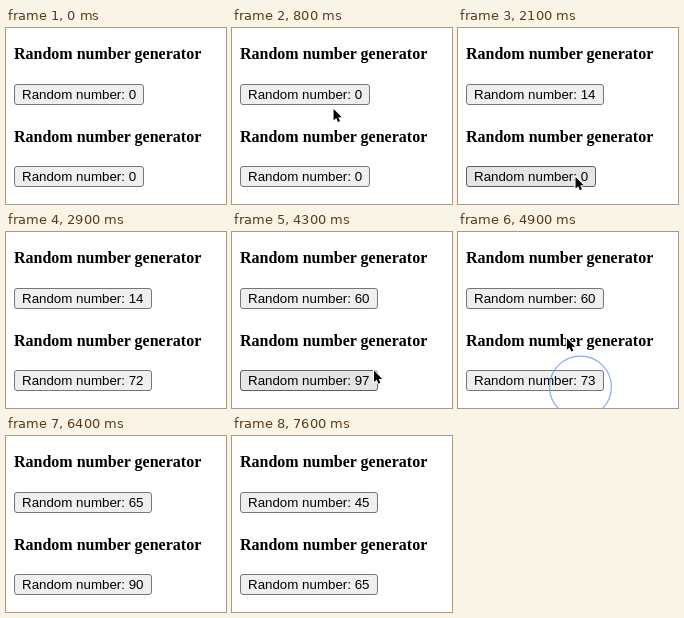
These frames come from a looping animation (220x176 px, 7.7 s). An HTML page with a canvas:

```html
<!DOCTYPE html>
<html lang="en">
<head>
<meta charset="utf-8">
<title>Random number generator</title>
<style>
  html, body { margin: 0; width: 100%; height: 100%; overflow: hidden; background: #fff; }
  #stage { position: relative; width: 220px; height: 176px; overflow: hidden; }
  h4, .button { position: absolute; left: 8px; margin: 0; color: #000; white-space: nowrap; }
  h4 { font: bold 16px/18px "Liberation Serif", serif; transform: translateY(0.5px); }
  .button {
    box-sizing: border-box; height: 21px; padding: 0 7px;
    border: 1px solid #767676; border-radius: 3px; background: #efefef;
    font: 13.333px/19px "Liberation Sans", sans-serif;
  }
  .button.hover { background: #e5e5e5; border-color: #5c5c5c; }
  canvas { position: absolute; left: 0; top: 0; width: 220px; height: 176px; }
</style>
</head>
<body>
<div id="stage"></div>
<script>
const LOOP = 7700, STEP = 100;
const RING_LIFE = 300, RING_RADIUS = 33;
const MS_PER_PX = 5.9;
const ENTRY = { at: 0, x: 150, y: 112 };

// Presses with a place come from the pointer, the others from the keyboard.
const presses = [
  { at: 1060, row: 0, value: 11, x: 81.5, y: 68 },
  { at: 1560, row: 0, value: 14, x: 81.5, y: 68 },
  { at: 2160, row: 1, value: 72, x: 118, y: 150 },
  { at: 3460, row: 0, value: 60, x: 104, y: 67 },
  { at: 4000, row: 1, value: 97, x: 142, y: 138.5 },
  { at: 4720, row: 1, value: 73, x: 122.5, y: 155 },
  { at: 5260, row: 0, value: 65, x: 98, y: 67 },
  { at: 5900, row: 1, value: 90 },
  { at: 7000, row: 0, value: 45 },
  { at: 7300, row: 1, value: 65 }
];
const clicks = presses.filter(press => "x" in press);
const pointerShown = t => (t >= 600 && t < 2700) || (t >= 3200 && t < 5800);

const mix = (a, b, p) => a + (b - a) * p;
const clamp = p => Math.max(0, Math.min(1, p));
const easeOut = (p, power) => 1 - (1 - p) ** power;

const stage = document.getElementById("stage");
function add(tag, top, text = "") {
  const node = document.createElement(tag);
  node.style.top = top + "px";
  node.textContent = text;
  return stage.appendChild(node);
}

const buttons = [0, 1].map(row => {
  add("h4", 16 + 83 * row, "Random number generator");
  const button = add("div", 56 + 82 * row);
  button.className = "button";
  return button;
});

const canvas = add("canvas", 0);
const ctx = canvas.getContext("2d");
const scale = window.devicePixelRatio || 1;
canvas.width = 220 * scale;
canvas.height = 176 * scale;
const arrow = new Path2D("M0 0V11.6L2.7 9.2L4.4 13.2L6.4 12.3L4.7 8.4H8.2Z");

// The pointer rests after each click, then glides to reach the next in time.
function pointerAt(t) {
  if (!pointerShown(t)) return null;
  const from = clicks.filter(click => click.at <= t).pop() || ENTRY;
  const to = clicks.find(click => click.at > t) || from;
  const glide = Math.min(
    MS_PER_PX * Math.hypot(to.x - from.x, to.y - from.y), to.at - from.at) || 1;
  const p = easeOut(clamp(1 - (to.at - t) / glide), 2);
  return { x: mix(from.x, to.x, p), y: mix(from.y, to.y, p) };
}

function drawRing({ at, x, y }, t) {
  const p = (t - at) / RING_LIFE;
  if (p < 0 || p >= 1) return;
  ctx.strokeStyle = `rgba(95, 145, 230, ${Math.min(0.75, 5 * (1 - p) ** 2)})`;
  ctx.lineWidth = 1.2;
  ctx.beginPath();
  ctx.arc(x, y, RING_RADIUS * easeOut(p, 3), 0, Math.PI * 2);
  ctx.stroke();
}

function drawPointer({ x, y }) {
  ctx.save();
  ctx.translate(x, y);
  ctx.lineJoin = "round";
  ctx.lineWidth = 2;
  ctx.strokeStyle = "#fff";
  ctx.stroke(arrow);
  ctx.fillStyle = "#000";
  ctx.fill(arrow);
  ctx.restore();
}

function updateButton(button, row, t, pointer) {
  const last = presses.filter(press => press.row === row && press.at <= t).pop();
  const label = "Random number: " + (last ? last.value : 0);
  if (button.textContent !== label) button.textContent = label;
  const { offsetLeft, offsetTop, offsetWidth, offsetHeight } = button;
  const over = pointer &&
    pointer.x >= offsetLeft && pointer.x < offsetLeft + offsetWidth &&
    pointer.y >= offsetTop && pointer.y < offsetTop + offsetHeight;
  button.classList.toggle("hover", Boolean(over));
}

function render(t) {
  const pointer = pointerAt(t);
  buttons.forEach((button, row) => updateButton(button, row, t, pointer));
  ctx.setTransform(scale, 0, 0, scale, 0, 0);
  ctx.clearRect(0, 0, 220, 176);
  clicks.forEach(click => drawRing(click, t));
  if (pointer) drawPointer(pointer);
}

const begin = performance.now();
function tick() {
  const t = (performance.now() - begin) % LOOP;
  render(Math.floor(t / STEP) * STEP);
  requestAnimationFrame(tick);
}
tick();
</script>
</body>
</html>
```
